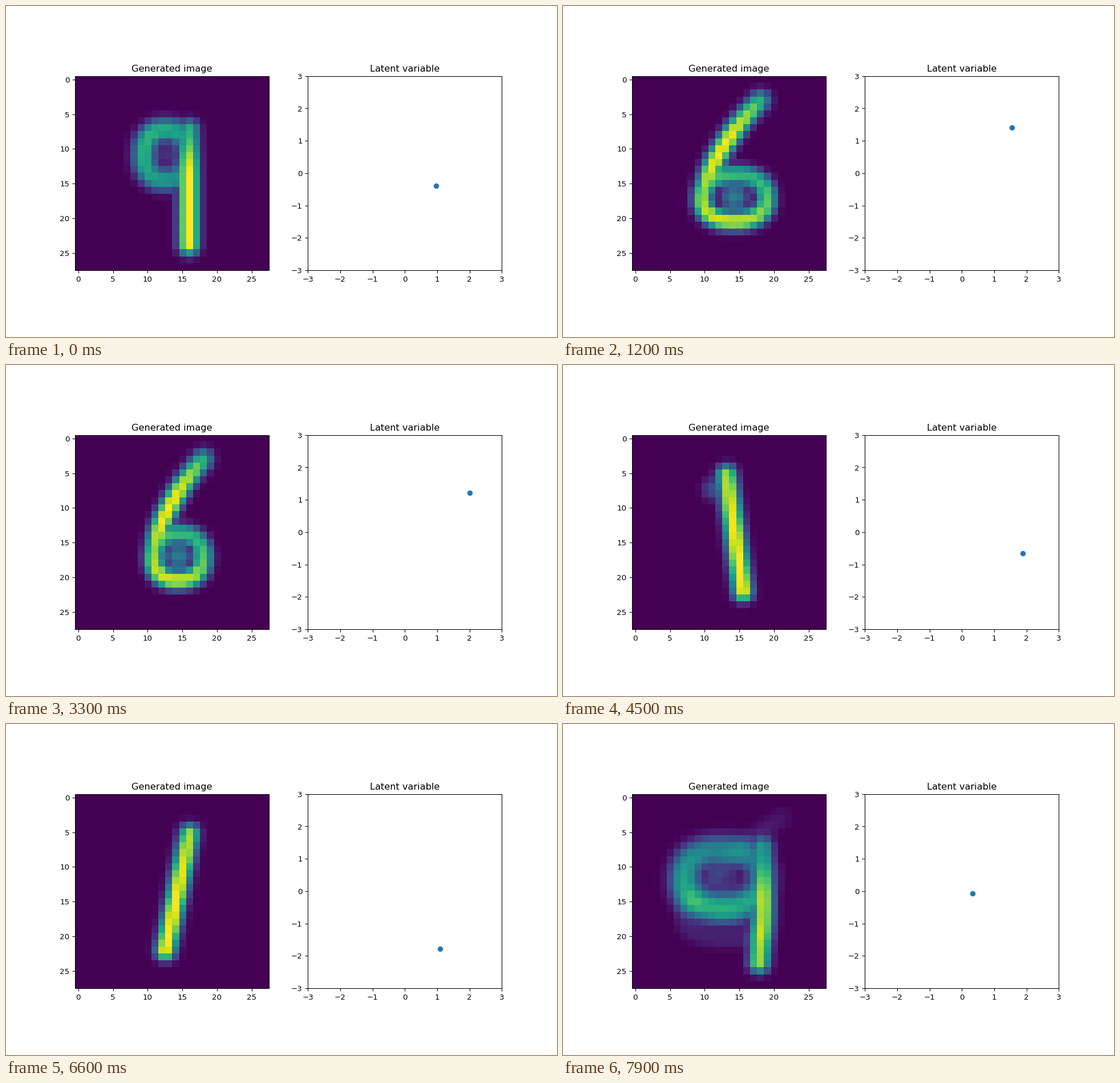
A matplotlib script for the animation above (8 s loop, 966 px wide and 580 px high).

```python
import numpy as np
import matplotlib.pyplot as plt
from matplotlib.animation import FuncAnimation

FRAMES, STEP, DPI = 80, 100, 96.6
ROWS, COLS = np.mgrid[0:28, 0:28][..., None]
T = np.linspace(0, 1, 120)


def latent(k):
    return 2 * np.sin(0.503 + 0.0313 * k), 2 * np.sin(0.0816 * k - 0.2)


def smooth(a, b, v):
    u = np.clip((v - a) / (b - a), 0, 1)
    return u * u * (3 - 2 * u)


def mix(a, b, u):
    return a + (b - a) * u


def stroke(x, y, level, width):
    """Soft brush along a path, fading with distance from it."""
    d = np.hypot(COLS - x, ROWS - y)
    return (level * np.exp(-(d / width) ** 2.4)).max(axis=-1)


def bend(start, control, end, level, width):
    x, y = (a * (1 - T) ** 2 + 2 * b * T * (1 - T) + c * T ** 2
            for a, b, c in zip(start, control, end))
    return stroke(x, y, level, width)


def ring(left, right, cy, ry, level, tilt, width):
    """Slightly square loop, brighter on the left and, by tilt, below."""
    c, s = np.cos(2 * np.pi * T), np.sin(2 * np.pi * T)
    x = (left + right) / 2 + (right - left) / 2 * np.sign(c) * abs(c) ** 0.85
    y = cy + ry * np.sign(s) * abs(s) ** 0.85
    return stroke(x, y, level + tilt * s - 0.06 * c, width)


def blob(x, y, level, width):
    return stroke(np.array([x]), np.array([y]), level, width)


def six(x, y):
    dx, dy = x - 1.8, max(y, 0.9) - 1.5
    tip = 17.4 - 1.3 * dx - 2.8 * dy
    left = 10.2 + 2.4 * dx - 0.45 * dy
    right = 18.7 - 1.3 * dx + 1.9 * dy
    knee = left + 0.6 - 1.6 * dx - dy
    shank = 0.55 + 0.45 * np.sqrt(np.sin(np.pi * T))
    return [bend((tip, 3), (knee, 10.6), (left, 17.2), shank, 1.45),
            ring(left, right, 17.1, 3.3, 0.8, 0.13, 1.42),
            blob((left + right) / 2, 17, 0.43, 2)]


def one(x, y):
    u = np.clip((1.89 - x) / 0.81, -0.1, 1.3)
    top, foot = 13.1 + 2.9 * u, 15.5 - 3 * u
    level = 1 - 0.14 * (1 - T) ** 4
    return [stroke(mix(top, foot, T), mix(5.3, 22.1, T), level, 1.45),
            blob(11.2, 7.3, 0.25 * max(0, 1 - u), 1.6)]


def nine(x, y):
    shift = 3.8 * (0.96 - min(x, 1.2))
    grow = np.clip(shift / 2.4, 0, 1)
    lean = max(0, -0.4 - y)
    stem, left = 15.9 + shift, 9.4 - shift + 4 * lean
    cy, ry = mix(10.9, 11.8, grow), mix(3.6, 4.2, grow)
    foot = stem - 2.2 * lean - 0.5 * grow
    level = mix(0.64, 1, smooth(0, 0.45, T)) - 0.06 * grow
    return [ring(left, stem - 0.2, cy, ry, 0.58,
                 mix(-0.04, 0.1, grow), mix(1.65, 2.1, grow)),
            bend((stem, 7.3), (stem + 0.4 * grow, 14), (foot, 23.8), level, 1.5),
            blob((left + stem) / 2, cy, 0.14, mix(2, 3.2, grow))]


def digit(x, y):
    to_six = smooth(-0.3, 0.9, y)
    to_one = (1 - to_six) * smooth(1.25, 1.6, x - 0.6 * y)
    weights = (to_six, to_one, 1 - to_six - to_one)
    return sum(w * np.max(draw(x, y), axis=0)
               for draw, w in zip((six, one, nine), weights) if w > 0)


fig, (left_ax, right_ax) = plt.subplots(
    1, 2, figsize=(966.1 / DPI, 580.1 / DPI), dpi=DPI)
left_ax.set_title("Generated image")
image = left_ax.imshow(digit(*latent(0)), cmap="viridis", vmin=0, vmax=1)
right_ax.set_title("Latent variable")
right_ax.set(xlim=(-3, 3), ylim=(-3, 3), aspect="equal",
             xticks=range(-3, 4), yticks=range(-3, 4))
dot, = right_ax.plot([], [], "o", color="#1f77b4")


def update(k):
    x, y = latent(k)
    image.set_data(digit(x, y))
    dot.set_data([x], [y])
    return image, dot


anim = FuncAnimation(fig, update, frames=FRAMES, interval=STEP,
                     repeat=True, repeat_delay=0)
plt.show()
```
